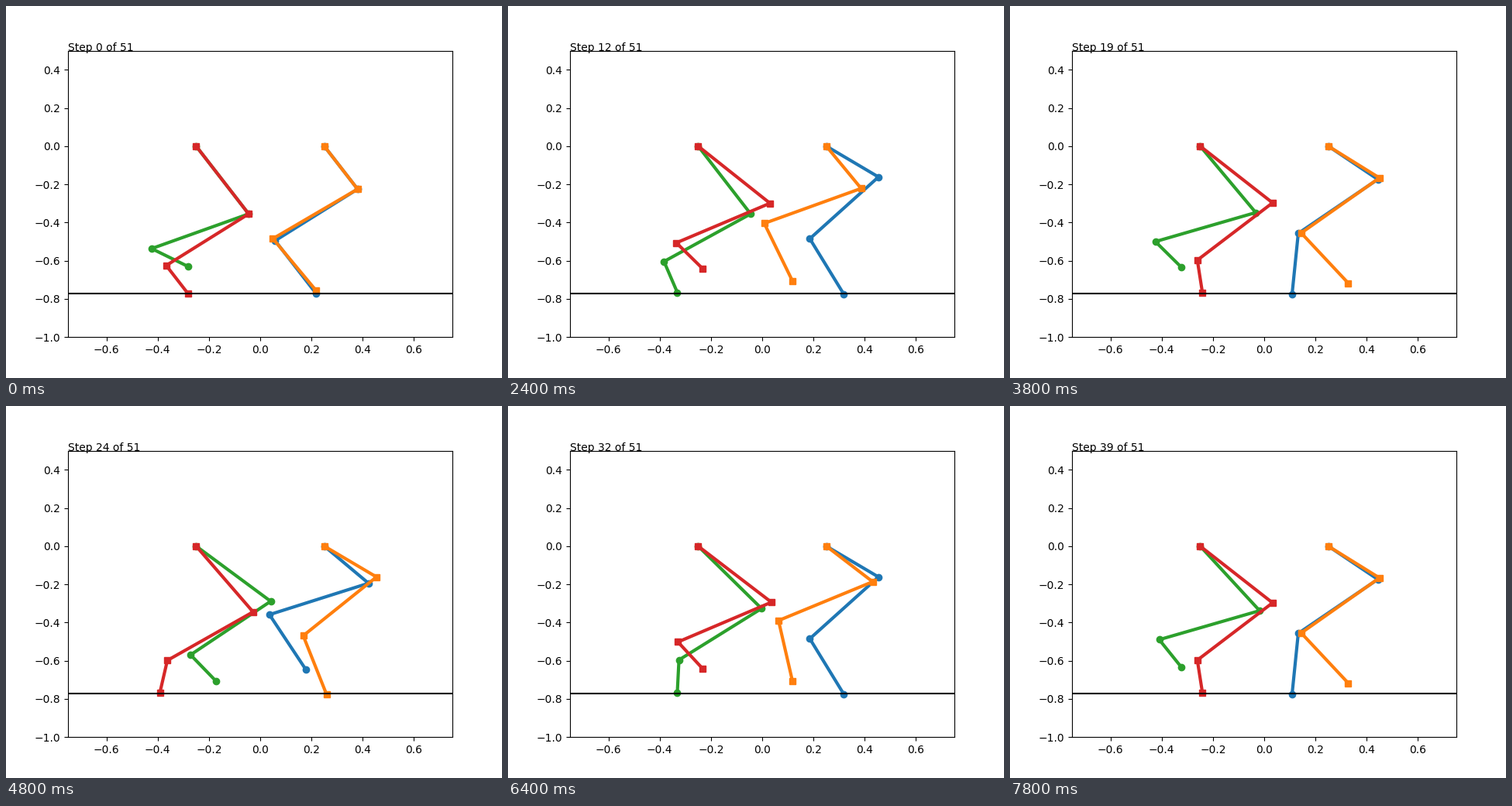
These frames come from a looping animation (640x480 px, 8 s). A matplotlib script:

```python
import numpy as np
import matplotlib.pyplot as plt
from matplotlib.animation import FuncAnimation

CYCLE = 20           # steps per gait cycle
HALF = CYCLE / 2     # length of a swing and of a stance
FRAMES = 40
TOTAL = 51
SPEED = 0.03         # foot travel per step
LIFT = 0.143         # height of a swing
LAG = 0.35
SETTLE = 8           # steps until the hip leaves its start angle behind
START = 30
STAND = np.radians([START, -50, START])


class Leg:
    """Three links: the hip follows a cycle, the ankle is solved for the foot."""

    def __init__(self, hip_x, links, swing, turn, hip_keys, floor):
        self.hip = np.array([hip_x, 0.0])
        self.links = links
        self.hip_keys = np.array(hip_keys).T
        self.floor = floor
        self.turn = turn                    # half a cycle for the right legs
        self.lift = swing + turn + LAG      # first lift-off
        # The foot joins the walk when the path passes its standing place
        self.join = (self.lift + HALF / 2) % HALF
        if self.join < LAG:
            self.join += HALF
        self.stand = self.hip + [np.dot(links, np.sin(STAND)),
                                 -np.dot(links, np.cos(STAND))]

    def foot(self, step):
        phase = (step - self.lift) % CYCLE
        x, y = self.stand
        if step > self.join:
            x += SPEED * (HALF / 2 - abs(phase - HALF))
            y = self.floor
        return np.array([x, y + LIFT * max(0, np.sin(np.pi * phase / HALF))])

    def hip_angle(self, step):
        gait = np.interp(step - self.turn, *self.hip_keys, period=CYCLE)
        t = np.clip((step - self.lift % CYCLE) / SETTLE, 0, 1)
        return np.radians(START + (gait - START) * t * t * (3 - 2 * t))

    def joints(self, step):
        upper, lower, end = self.links
        angle = self.hip_angle(step)
        knee = self.hip + upper * np.array([np.sin(angle), -np.cos(angle)])
        foot = self.foot(step)
        # Two-link inverse kinematics, with the ankle bent backwards
        reach = foot - knee
        dist = np.hypot(*reach)
        ux, uy = reach / dist
        along = (dist**2 + lower**2 - end**2) / (2 * dist)
        off = np.sqrt(max(lower**2 - along**2, 0))
        ankle = knee + along * np.array([ux, uy]) + off * np.array([uy, -ux])
        return np.array([self.hip, knee, ankle, foot]).T


# Hip keys: phase, angle in degrees
front = dict(hip_x=0.25, links=(0.26, 0.42, 0.32), swing=0, floor=-0.776,
             hip_keys=[(4, 41.6), (6, 46), (10, 51.6), (16.2, 51.6)])
hind = dict(hip_x=-0.25, links=(0.41, 0.42, 0.17), swing=-5, floor=-0.766,
            hip_keys=[(2.3, 45.2), (7, 45.2), (9, 43.6), (16.7, 27)])
legs = [Leg(turn=turn, **kind) for kind in (front, hind) for turn in (0, HALF)]

fig, ax = plt.subplots(figsize=(6.4, 4.8), dpi=100)
ax.set_xlim(-0.75, 0.75)
ax.set_ylim(-1, 0.5)
lines = [ax.plot([], [], style, color=color, lw=3)[0]
         for style, color in zip(("o-", "s-") * 2, ("C0", "C1", "C2", "C3"))]
ax.axhline(legs[0].stand[1], color="k", lw=1.5)
label = ax.text(-0.75, 0.5, "")


def draw(step):
    for line, leg in zip(lines, legs):
        line.set_data(*leg.joints(step))
    label.set_text(f"Step {step} of {TOTAL}")
    return [*lines, label]


anim = FuncAnimation(fig, draw, frames=FRAMES, interval=200,
                     repeat=True, repeat_delay=0)
plt.show()
```
